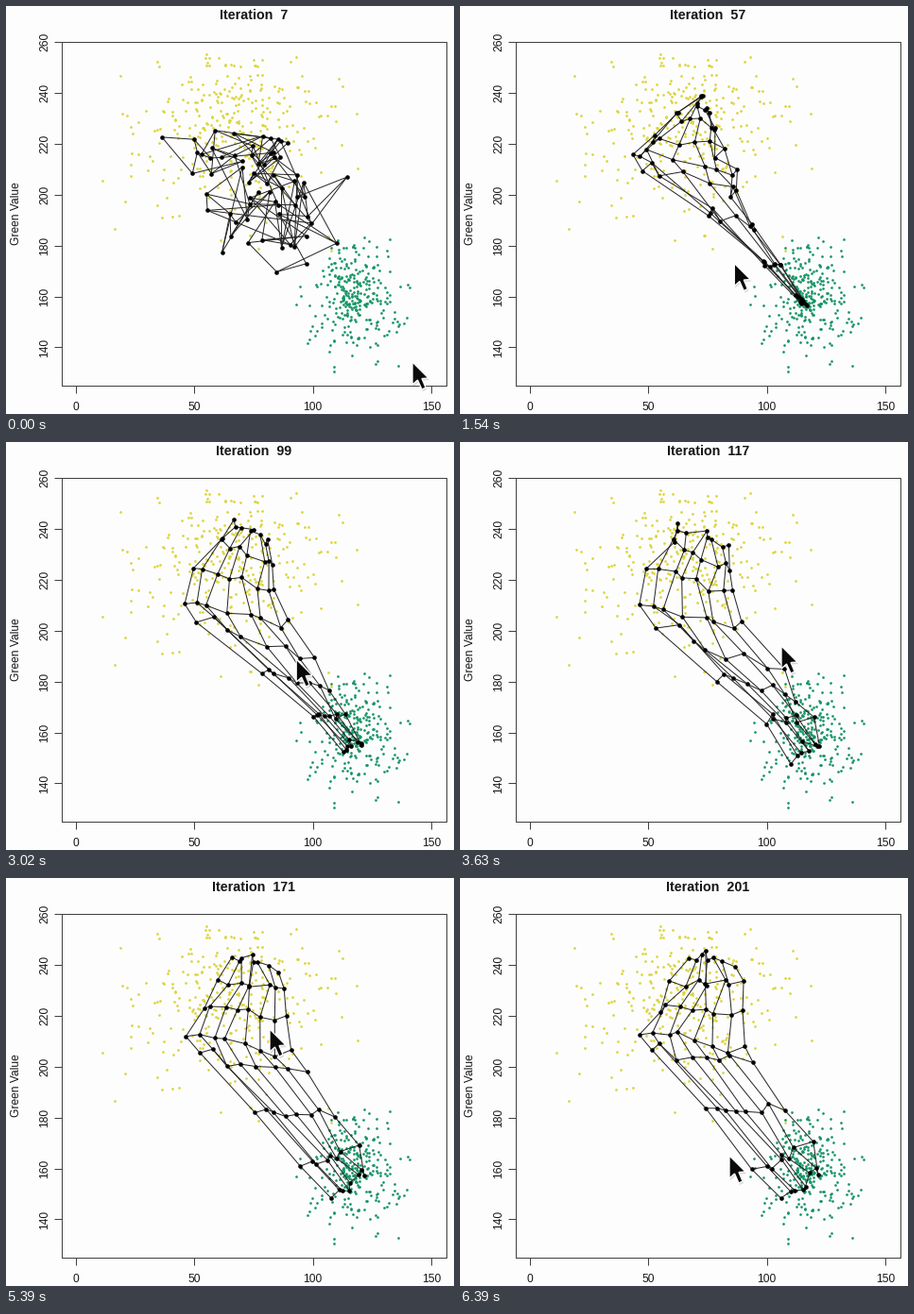
These frames come from a looping animation (474x432 px, 6.46 s). A matplotlib script:

```python
import numpy as np
import matplotlib
import matplotlib.pyplot as plt
from matplotlib.animation import FuncAnimation
from matplotlib.collections import LineCollection
from matplotlib.patches import Polygon

matplotlib.rcParams["font.family"] = "Liberation Sans"
matplotlib.rcParams["toolbar"] = "None"

W, H, DPI = 474, 432, 100
PX = 72 / DPI
LOOP, TICK, STEPS = 6460, 20, 84
SIDE = 8
LEFT, RIGHT, TOP, BOTTOM = 58.7, 465.6, 37.8, 401.7
INK = "#161616"

fig = plt.figure(figsize=(W / DPI, H / DPI), dpi=DPI, facecolor="#fdfdfd")
ax = fig.add_axes([0, 0, 1, 1])
ax.set(xlim=(0, W), ylim=(H, 0))
ax.axis("off")


def line(xs, ys):
    ax.plot(xs, ys, color="#404040", lw=PX, solid_capstyle="butt")


def label(x, y, s, size=12, **kw):
    kw.setdefault("va", "center_baseline")
    return ax.text(x, y, s, size=size * PX, color=INK, ha="center", **kw)


# plot frame and axes
line([LEFT, RIGHT, RIGHT, LEFT, LEFT], [TOP, TOP, BOTTOM, BOTTOM, TOP])
for v in range(0, 151, 50):
    x = 74 + v * 2.507
    line([x, x], [BOTTOM, BOTTOM + 8])
    label(x, 424, str(v))
for v in range(140, 261, 20):
    y = TOP + (260 - v) * 2.697
    line([LEFT - 8, LEFT], [y, y])
    label(41.5, y, str(v), rotation=90, va="center")
label(11, 220, "Green Value", rotation=90, va="center")
title = label(262.3, 9, "", 14.3, weight="bold")


def cloud(seed, n, mid, sd, low, high, color):
    """Gaussian blob with a dense core and a few far points."""
    rng = np.random.default_rng(seed)
    reach = rng.uniform(0.6, 1.5, (3 * n, 1))
    p = mid + rng.normal(size=(3 * n, 2)).clip(-2.1, 2.1) * sd * reach
    p = p[(p[:, 1] > low) & (p[:, 1] < high)][:n]
    ax.plot(*p.T, "o", ms=2.7 * PX, mew=0, color=color)


cloud(4, 325, (239, 119), (45, 47), 51, 262, "#dbd43a")
cloud(9, 300, (366, 308), (20, 27), 236, 401, "#169466")


def ruled(seed, noise, pinch, left, right):
    """Lattice spanned between two edges; pinch gathers units at the edges."""
    t = np.linspace(0, 1, SIDE)

    def edge(points):
        knots = np.linspace(0, 1, len(points))
        return np.stack([np.interp(t, knots, c) for c in zip(*points)], axis=-1)

    w = (t ** pinch / (t ** pinch + (1 - t) ** pinch))[:, None, None]
    jitter = np.random.default_rng(seed).normal(size=(SIDE, SIDE, 2))
    return edge(left) * (1 - w) + edge(right) * w + noise * jitter.clip(-2, 2)


# the map at its turning points: step -> lattice
POSES = {
    0: ruled(5, 25, 1,
             [(185, 172), (228, 160), (240, 195), (262, 240)],
             [(298, 160), (318, 178), (312, 225), (318, 262)]),
    9: ruled(2, 2.5, 3,
             [(249, 126), (212, 143), (182, 152), (200, 166), (286, 235), (352, 310)],
             [(254, 148), (258, 150), (281, 161), (300, 187), (321, 229), (354, 314)]),
    30: ruled(3, 3, 1.8,
              [(254, 80), (220, 110), (191, 160), (197, 174), (322, 276), (363, 308)],
              [(270, 92), (277, 130), (293, 180), (294, 215), (322, 270), (367, 317)]),
    47: ruled(4, 4, 1.2,
              [(233, 87), (215, 110), (188, 167), (218, 201), (310, 282), (356, 333)],
              [(282, 109), (288, 140), (288, 188), (345, 250), (362, 280), (378, 318)]),
    83: ruled(6, 4, 1,
              [(238, 78), (226, 122), (184, 156), (205, 184), (300, 296), (342, 334)],
              [(288, 89), (298, 120), (299, 178), (310, 200), (362, 275), (386, 312)]),
}
MARKS = list(POSES)

# step -> iteration shown and pointer tip
KEYS = [0, 9, 30, 47, 58, 70, 83]
COUNTS = [7, 31, 79, 117, 145, 171, 201]
TIPS = np.array([(430, 377), (316, 302), (268, 247), (340, 216),
                 (292, 245), (279, 160), (285, 294)])
ARROW = np.array([(0, 0), (0, 24), (5.5, 19), (10, 29), (14, 27),
                  (10, 17.5), (17, 17)])

net = LineCollection([], colors="#262626", linewidths=PX, zorder=4)
ax.add_collection(net)
units, = ax.plot([], [], "o", ms=4.6 * PX, mew=0, color="black", zorder=5)
shadow = Polygon(ARROW, fc="black", alpha=0.15, lw=0, zorder=6)
cursor = Polygon(ARROW, fc="#0a0a0a", ec="white", lw=1.3 * PX, zorder=7)
ax.add_patch(shadow)
ax.add_patch(cursor)


def locate(k, marks):
    """Segment of marks holding step k, and progress through it."""
    j = min(np.searchsorted(marks, k, side="right"), len(marks) - 1) - 1
    return j, (k - marks[j]) / (marks[j + 1] - marks[j])


def update(i):
    k = int((i * TICK + 12) * STEPS / LOOP)

    # units settle from pose to pose, shaking less as training goes on
    j, u = locate(k, MARKS)
    a, b = POSES[MARKS[j]], POSES[MARKS[j + 1]]
    shake = (10 * np.exp(-k / 8) + 1.5) * np.sin(np.pi * u)
    noise = np.random.default_rng(k).normal(size=a.shape)
    grid = a + (b - a) * u ** 0.7 + shake * noise
    net.set_segments(list(grid) + list(grid.transpose(1, 0, 2)))
    units.set_data(grid[..., 0].ravel(), grid[..., 1].ravel())

    count = 2 * int(np.interp(k, KEYS, COUNTS) // 2) + 1
    title.set_text(f"Iteration  {count}")

    j, u = locate(k, KEYS)
    tip = TIPS[j] + (TIPS[j + 1] - TIPS[j]) * u * u * (3 - 2 * u)
    cursor.set_xy(ARROW + tip)
    shadow.set_xy(ARROW + tip + (1, 2))
    return net, units, title, shadow, cursor


anim = FuncAnimation(fig, update, frames=LOOP // TICK, interval=TICK,
                     repeat=True, repeat_delay=0, blit=False)
plt.show()
```
